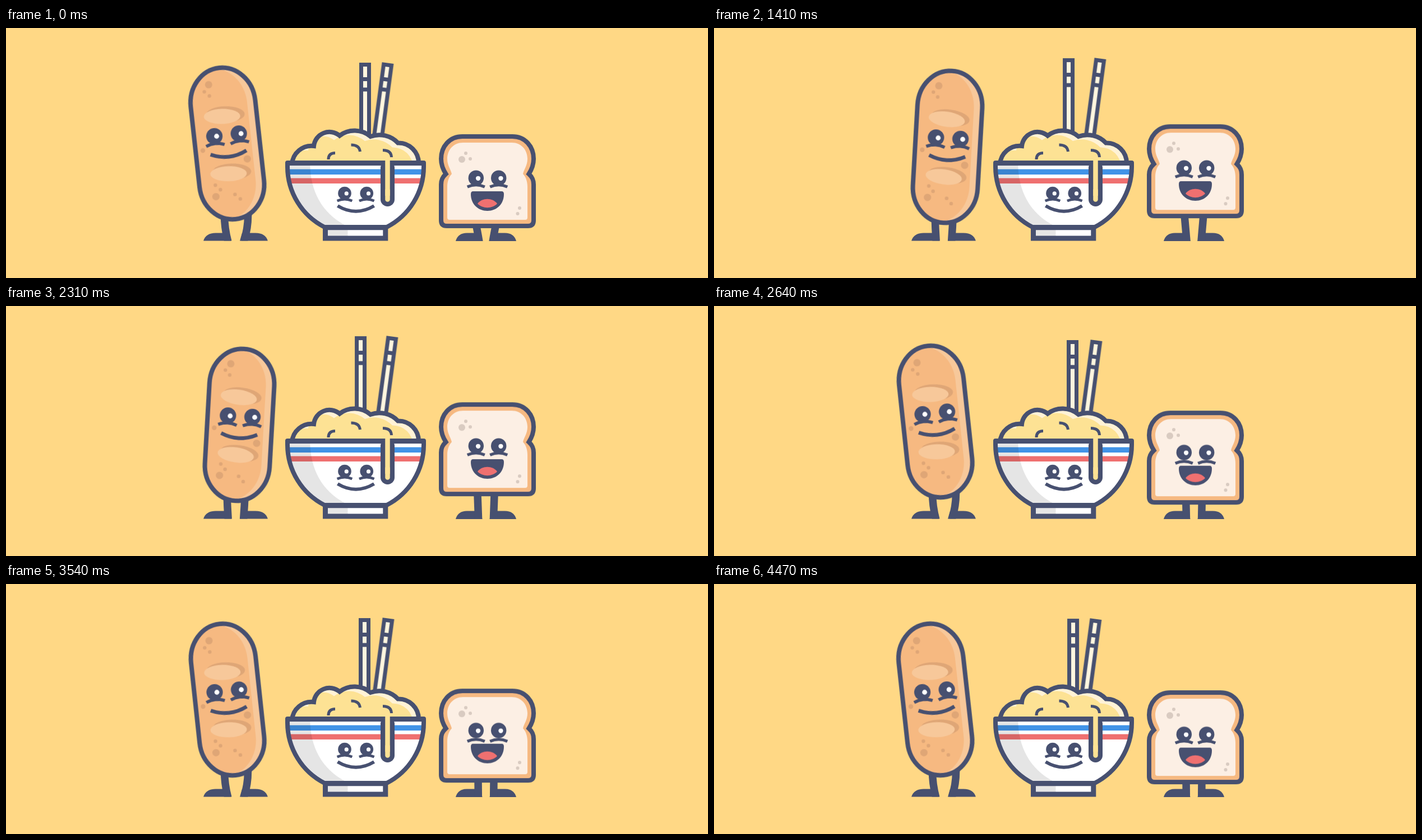
An HTML page for the animation above (4.5 s loop, 1252 by 447 pixels).

```html
<!DOCTYPE html>
<html lang="en">
<head>
<meta charset="utf-8">
<title>Happy carbs</title>
<style>
  html, body { margin: 0; width: 100%; height: 100%; overflow: hidden; background: #ffd885; }
  svg { display: block; width: 100%; height: 100%; }

  .ink { fill: #475070; }
  .line { fill: none; stroke: #475070; }
  .out { stroke: #475070; stroke-width: 8; }
  .crust { fill: #f6b981; }
  .glow { fill: #f7c89a; }
  .dent { fill: #dfa676; }
  .crumb { fill: #d9cbc1; }
  .red { fill: #ef7070; }
  .stick { fill: #fff6df; stroke: #475070; stroke-width: 7; }

  .move { animation: 450ms -15ms infinite alternate both; }
  .sway { animation-timing-function: cubic-bezier(.455, .03, .515, .955); }
  .hop { animation-timing-function: cubic-bezier(.333, .833, .667, 1); }
  .snap { animation-timing-function: cubic-bezier(.16, 1, .3, 1); }
  .lift { animation-timing-function: cubic-bezier(.333, .667, .667, 1); }

  .loaf { animation-name: loaf; }
  .loaf-leg-l { animation-name: loaf-leg-l; }
  .loaf-leg-r { animation-name: loaf-leg-r; }
  .stick-l { animation-name: stick-l; }
  .stick-r { animation-name: stick-r; }
  .toast { animation-name: toast; }
  .toast-face { animation-name: toast-face; }
  .toast-leg { animation-name: toast-leg; }

  @keyframes loaf {
    from { transform: translate(394.7px, 206.5px) rotate(-6.3deg); }
    to { transform: translate(417.9px, 212.9px) rotate(3.85deg); }
  }
  @keyframes loaf-leg-l {
    from { d: path("M389.5 330 Q389 356 396 382"); }
    to { d: path("M394.3 334 Q395 358 396.3 382"); }
  }
  @keyframes loaf-leg-r {
    from { d: path("M431.5 330 Q432.5 356 424 382"); }
    to { d: path("M426 334 Q425 358 423.5 382"); }
  }
  @keyframes stick-l {
    from { transform: translate(.6px, .6px); }
    to { transform: translate(-8.2px, -8.2px); }
  }
  @keyframes stick-r {
    from { transform: translate(-.6px, .6px); }
    to { transform: translate(8.2px, -8.2px); }
  }
  @keyframes toast {
    from { transform: translateY(1.6px); }
    to { transform: translateY(-18.2px); }
  }
  @keyframes toast-face {
    from { transform: translateY(4.7px); }
    to { transform: translateY(-18.1px); }
  }
  @keyframes toast-leg {
    from { d: path("M834 345 Q840.5 364 844.5 382"); }
    to { d: path("M841.8 325 Q842 360 842.3 382"); }
  }
</style>
</head>
<body>
<svg viewBox="0 0 1252 447" preserveAspectRatio="none">
  <defs>
    <g id="eye">
      <circle class="ink" r="14.6"/>
      <circle cx="4" cy=".5" r="4.4" fill="#fff"/>
    </g>
    <path id="cheek" class="line" stroke-width="5.6" d="M-16.5 16.8Q0 9.5 16.5 16.8"/>
    <g id="score">
      <ellipse class="dent" cx="6" cy="-3.5" rx="34.5" ry="14.5"/>
      <ellipse class="glow" rx="32.5" ry="13.5"/>
    </g>
    <g id="stick">
      <path class="stick" d="M-7 3.5H7V145H-7Z"/>
      <path class="line" stroke-width="7" d="M-7 29.5H7M-7 48H7"/>
    </g>
    <g id="foot">
      <path class="ink" d="M802 381Q806 366.5 822 366.5H845L849.5 381Z"/>
      <path class="line move hop toast-leg" stroke-width="13.5" d="M834 345Q840.5 364 844.5 382"/>
    </g>
    <rect id="loaf" x="-57.8" y="-136" width="115.6" height="272" rx="57.8" ry="64"/>
    <path id="mound" d="M510 244A35 35 0 0 1 549 211A28 28 0 0 1 595 192.500A44 44 0 0 1 650 194A46 46 0 0 1 699 205.500A36 36 0 0 1 736 242Z"/>
    <path id="bowl" d="M502 241H745V248A121.5 121.5 0 0 1 679 356H568A121.5 121.5 0 0 1 502 248Z"/>
    <clipPath id="in-loaf"><use href="#loaf"/></clipPath>
    <clipPath id="in-mound"><use href="#mound"/></clipPath>
    <clipPath id="in-bowl"><use href="#bowl"/></clipPath>
    <clipPath id="ground"><path d="M0 0H1252V380.6H0Z"/></clipPath>
  </defs>

  <rect width="1252" height="447" fill="#ffd885"/>

  <!-- Loaf -->
  <g clip-path="url(#ground)">
    <path class="ink" d="M352 381Q356 366.5 374 366.5H398L402 381Z"/>
    <path class="ink" d="M467 381Q463 366.5 445 366.5H421L417 381Z"/>
    <path class="line move sway loaf-leg-l" stroke-width="13.5" d="M389.5 330Q389 356 396 382"/>
    <path class="line move sway loaf-leg-r" stroke-width="13.5" d="M431.5 330Q432.5 356 424 382"/>
  </g>
  <g class="move sway loaf">
    <g clip-path="url(#in-loaf)">
      <use href="#loaf" class="glow"/>
      <rect class="crust" x="-75" y="-136" width="118" height="272" rx="58" ry="66"/>
    </g>
    <g class="dent">
      <circle cx="-21.8" cy="-108.2" r="6.5"/>
      <circle cx="-30.8" cy="-96.4" r="3.2"/>
      <circle cx="-22.6" cy="-88" r="3.2"/>
      <circle cx="-44.8" cy="7.7" r="4.2"/>
      <circle cx="32.3" cy="31.2" r="6.5"/>
      <circle cx="-29.4" cy="71.7" r="3.2"/>
      <circle cx="-21.3" cy="80.7" r="3.2"/>
      <circle cx="-30.6" cy="92.2" r="6.5"/>
      <circle cx="3.6" cy="91.9" r="3.2"/>
      <circle cx="12.2" cy="100.9" r="3.2"/>
    </g>
    <use href="#score" transform="translate(-4.2 -49.2) rotate(5)"/>
    <use href="#score" transform="translate(-3.8 53.9) rotate(5)"/>
    <use href="#loaf" class="out" fill="none"/>
    <use href="#eye" x="-21.6" y="-15.5"/>
    <use href="#eye" x="22.2" y="-15.5"/>
    <use href="#cheek" x="-21.6" y="-15.5"/>
    <use href="#cheek" x="22.2" y="-15.5"/>
    <path class="line" stroke-width="6.5" d="M-32 16.5Q.5 31.5 32.5 16"/>
  </g>

  <!-- Noodle bowl -->
  <g class="move lift stick-l"><use href="#stick" x="640.5" y="62"/></g>
  <g class="move lift stick-r"><use href="#stick" transform="translate(681 62.6) rotate(7.6)"/></g>

  <use href="#mound" fill="#fff2d6"/>
  <g clip-path="url(#in-mound)"><use href="#mound" x="-10" y="8" fill="#fde294"/></g>
  <use href="#mound" class="out" fill="none"/>
  <path class="line" stroke-width="5" d="M575 235Q575 223.5 587 223.5M615.5 209Q630 209 631.5 221M672 218.5Q687 218.5 687.5 231"/>

  <g clip-path="url(#in-bowl)">
    <path fill="#fff" d="M498 237H750V360H498Z"/>
    <path fill="#4193e7" d="M498 252.5H750V262H498Z"/>
    <path class="red" d="M498 268.5H750V278H498Z"/>
    <path fill="#000" fill-opacity=".1" d="M498 237H542.5V250C545 300 570 337 612 356H498Z"/>
  </g>
  <use href="#bowl" class="out" fill="none" stroke-linejoin="round"/>
  <path class="line" stroke-width="9" d="M502 241.5H745"/>
  <path fill="#fff" d="M570 357H677V376H570Z"/>
  <path fill="#e6e6e6" d="M570 357H609.5V376H570Z"/>
  <path class="line" stroke-width="9" d="M569.5 356.8H676.8V376H569.5Z"/>
  <path class="line" stroke-width="25" stroke-linecap="round" d="M680.5 250V306.5"/>
  <path fill="none" stroke="#fde294" stroke-width="8.5" d="M680.5 236.5V300"/>
  <path fill="none" stroke="#fde294" stroke-width="8.5" stroke-linecap="round" d="M680.5 290V306.5"/>
  <g transform="translate(604 295.5) scale(.81)">
    <use href="#eye"/>
    <use href="#eye" x="48.5"/>
    <use href="#cheek"/>
    <use href="#cheek" x="48.5"/>
  </g>
  <path class="line" stroke-width="6" d="M591.5 318Q624 337.5 656.5 318"/>

  <!-- Toast -->
  <g clip-path="url(#ground)">
    <use href="#foot"/>
    <use href="#foot" transform="translate(1712 0) scale(-1 1)"/>
  </g>
  <g class="move hop toast">
    <path class="crust out" d="M814 194H903C926 194 941 212 941 234C941 246 937 254 932.5 261C939 267 941 272 941 280V344Q941 354 931 354H786Q776 354 776 344V280C776 272 778 267 784.5 261C780 254 776 246 776 234C776 212 791 194 814 194Z"/>
    <path fill="#fcefe4" d="M815 205H902C919 205 930 218 930 234C930 246 924 252 922 261C927 266 930 274 930 284V339Q930 343 926 343H791Q787 343 787 339V284C787 274 790 266 795 261C793 252 787 246 787 234C787 218 798 205 815 205Z"/>
    <g class="crumb">
      <circle cx="813" cy="235" r="6"/>
      <circle cx="828" cy="234" r="3"/>
      <circle cx="820" cy="224" r="3"/>
      <circle cx="916" cy="322" r="3"/>
      <circle cx="912.5" cy="332" r="3"/>
    </g>
    <use href="#cheek" transform="translate(838.3 268.3) scale(.94)"/>
    <use href="#cheek" transform="translate(878.7 268.3) scale(.94)"/>
  </g>
  <g class="move snap toast-face">
    <use href="#eye" transform="translate(838.3 268.3) scale(.94)"/>
    <use href="#eye" transform="translate(878.7 268.3) scale(.94)"/>
    <path class="ink" d="M833 292H884Q888 292 888 297C888 315 875 327 858.5 327C842 327 829 315 829 297Q829 292 833 292Z"/>
    <path class="red" d="M841 314C849 303 868 303 876 314C868 323.5 849 323.5 841 314Z"/>
  </g>
</svg>
</body>
</html>
```
